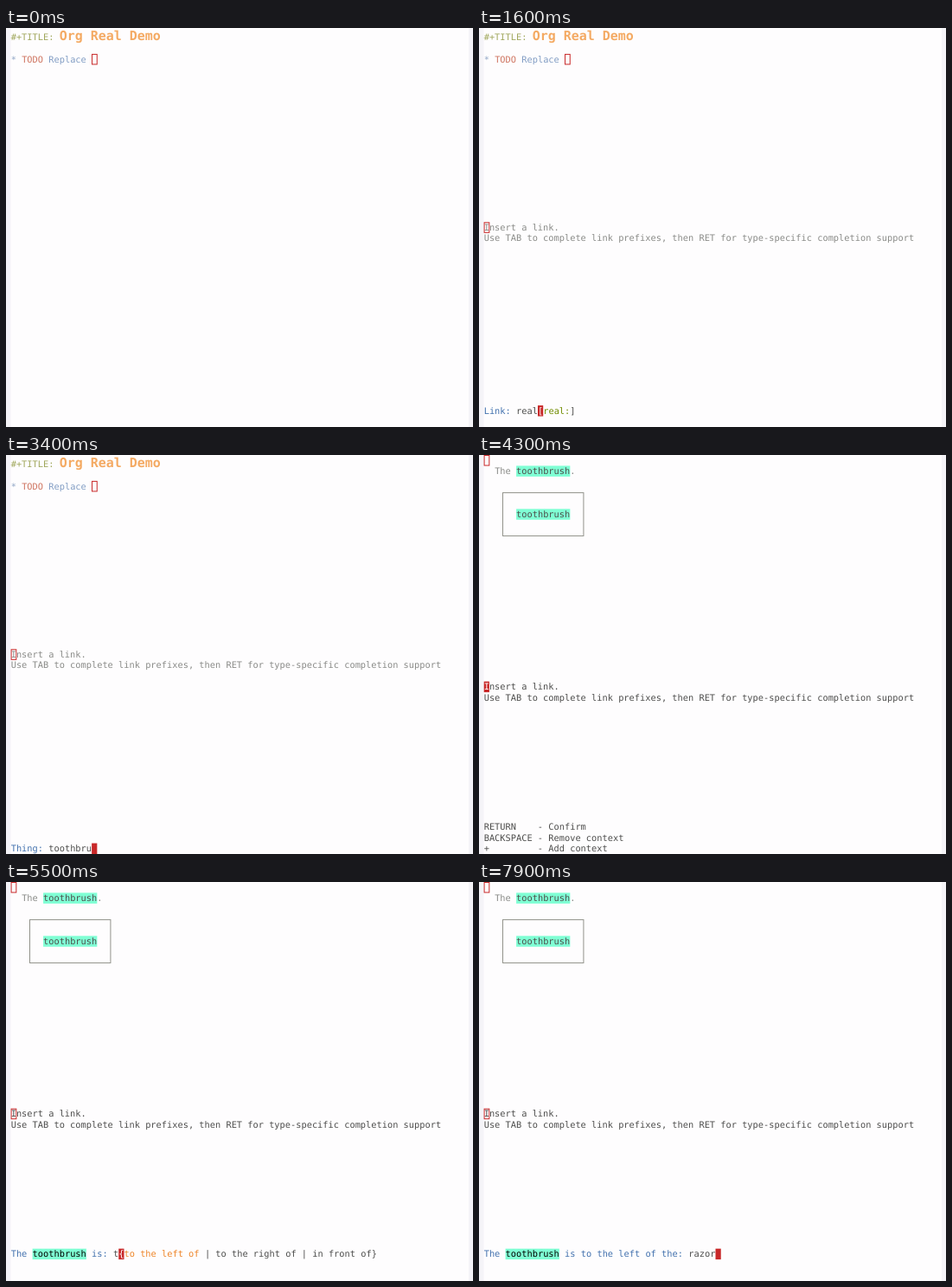
Write an HTML page that moves like this. It is 540 by 461 pixels and loops after 8000 ms.

```html
<!DOCTYPE html>
<html lang="en">
<head>
<meta charset="utf-8">
<title>Org Real Demo</title>
<style>
  html, body { margin: 0; width: 100%; height: 100%; overflow: hidden; background: #fefdfe; }
  svg { display: block; width: 540px; height: 461px; }
  text { font: 10.345px "DejaVu Sans Mono", monospace; white-space: pre; text-rendering: geometricPrecision; }
  .title { font-size: 14.95px; font-weight: bold; }
</style>
</head>
<body>
<svg id="stage" viewBox="0 0 540 461"></svg>
<script>
const LOOP = 8000, LEFT = 5.7, CHAR = 6.228, LINE = 12.46, COLUMNS = 85;
const FG = '#4d4d4c', DIM = '#8a8b88', RED = '#c82829', BLUE = '#4271ae';
const ORANGE = '#ee8427', GREEN = '#718c00', AQUA = '#7fffd4';
const stage = document.getElementById('stage');

const colX = col => LEFT + col * CHAR;
const rowY = row => row * LINE;
const box = (x, y, w, h, attrs) => `<rect x="${x}" y="${y}" width="${w}" height="${h}" ${attrs}/>`;
const label = (x, y, str, fill, cls = '') => `<text x="${x}" y="${y}" fill="${fill}" class="${cls}">${str}</text>`;
const hollow = (col, top) => box(colX(col) + .4, top + .5, CHAR - .5, LINE - .9, `fill="none" stroke="${RED}" stroke-width="1"`);
const solid = (col, top) => box(colX(col), top, CHAR, LINE, `fill="${RED}"`);

// A run is [text, colour, background].
function line(runs, row, col = 0) {
  let out = '';
  for (const [str, fill, back] of runs) {
    if (back) out += box(colX(col), rowY(row), str.length * CHAR, LINE, `fill="${back}"`);
    out += label(colX(col), rowY(row) + 9.75, str, fill);
    col += str.length;
  }
  return out;
}

function wrapArrows(row) {
  const y = rowY(row) + 6;
  const hook = 'fill="none" stroke="#4d4d4c" stroke-width=".9"';
  return `<path d="M536 ${y - 1.5}h2.6v3h-2.4m1.4-1.4l-1.4 1.4 1.4 1.4" ${hook}/>` +
    `<path d="M4 ${y + LINE - 1.5}h-2.6v3h2.4m-1.4-1.4l1.4 1.4-1.4 1.4" ${hook}/>`;
}

function choices(names, tail = '') {
  if (!names.length) return [];
  if (names.length === 1) return [['[', FG], [names[0], GREEN], [']', FG]];
  const rest = names.slice(1).map(name => ' | ' + name).join('');
  return [['{', FG], [names[0], ORANGE], [rest + tail + '}', FG]];
}

function minibuffer({ row, prompt, input = '', names = [], tail }) {
  const runs = [...prompt, [input, FG], ...choices(names, tail)];
  const cursor = [...prompt, [input]].reduce((n, [str]) => n + str.length, 0);
  let col = 0, out = '';
  for (const [str, fill, back] of runs) {
    const room = Math.max(0, COLUMNS - col);
    if (str.length > room) {
      out += line([[str.slice(0, room), fill, back]], row, col) + wrapArrows(row);
      out += line([[str.slice(room), fill, back]], row + 1);
    } else {
      out += line([[str, fill, back]], row, col);
    }
    col += str.length;
  }
  out += solid(cursor, rowY(row));
  if (names.length) out += line([[names.length > 1 ? '{' : '[', '#fff']], row, cursor);
  return out;
}

function orgWindow(active) {
  const [green, orange, star, red, blue] = active
    ? [GREEN, '#f5871f', BLUE, RED, BLUE]
    : ['#a0a75c', '#f4aa63', '#8fa5c5', '#cf7561', '#829dc4'];
  const top = 29.9;
  return label(LEFT, 13.9, '#+TITLE: ', green) + label(61.75, 13.9, 'Org Real Demo', orange, 'title') +
    label(LEFT, top + 9.75, '*', star) + label(colX(2), top + 9.75, 'TODO', red) +
    label(colX(7), top + 9.75, 'Replace', blue) +
    (active ? solid : hollow)(15, top);
}

function helpWindow(row, fill, active) {
  return line([['Insert a link.', fill]], row) +
    line([['Use TAB to complete link prefixes, then RET for type-specific completion support', fill]], row + 1) +
    (active ? solid(0, rowY(row)) + line([['I', '#fff']], row) : hollow(0, rowY(row)));
}

function realWindow() {
  const thing = ['toothbrush', FG, AQUA];
  return hollow(0, 0) +
    line([['The ', DIM], thing, ['.', DIM]], 1, 2) + line([thing], 5, 6) +
    box(colX(3.5), rowY(3.5), 15 * CHAR, 4 * LINE, 'fill="none" stroke="#91928a" stroke-width="1"');
}

const keyHelp = () => ['RETURN    - Confirm', 'BACKSPACE - Remove context', '+         - Add context']
  .map((str, i) => line([[str, FG]], 34 + i)).join('');

const linkTypes = 'eww rmail mhe irc info gnus docview bibtex bbdb w3m real id'.split(' ').map(s => s + ':');
const left = 'to the left of', right = 'to the right of', front = 'in front of';
const places = ['in', 'on', 'behind', front, 'above', 'below', left, right];

const insertScene = mini => orgWindow(false) + helpWindow(18, DIM, false) + minibuffer(mini);
const link = (input, names, tail) => () => insertScene({ row: 35, prompt: [['Link: ', BLUE]], input, names, tail });
const thing = input => () => insertScene({ row: 36, prompt: [['Thing: ', BLUE]], input });
const ask = (question, input, names) => () => realWindow() + helpWindow(21, FG, false) + minibuffer({
  row: 34, input, names, prompt: [['The ', BLUE], ['toothbrush', '#000', AQUA], [question, BLUE]]
});
const place = (input, names) => ask(' is: ', input, names);
const beside = input => ask(' is to the left of the: ', input);

const steps = [
  [0, () => orgWindow(false)],
  [400, () => orgWindow(true)],
  [900, link('', linkTypes, ' | ...')],
  [1300, link('r', ['rmail:', 'real:', 'irc:'])],
  [1400, link('re', ['real:'])],
  [1500, link('rea', ['real:'])],
  [1600, link('real', ['real:'])],
  [1800, link('real:')],
  [1900, thing('')],
  [2500, thing('t')],
  [2700, thing('to')],
  [2800, thing('too')],
  [2900, thing('toot')],
  [3100, thing('tooth')],
  [3300, thing('toothbr')],
  [3400, thing('toothbru')],
  [3500, thing('toothbrus')],
  [3600, thing('toothbrush')],
  [4300, () => realWindow() + helpWindow(21, FG, true) + keyHelp()],
  [4900, place('', places)],
  [5500, place('t', [left, right, front])],
  [5600, place('to the ', [left, right])],
  [5800, place('to the l', [left])],
  [6000, beside('')],
  [7200, beside('r')],
  [7400, beside('ra')],
  [7500, beside('raz')],
  [7700, beside('razo')],
  [7900, beside('razor')]
];

const backdrop = box(0, 0, 540, 461, 'fill="#fefdfe"') +
  box(0, 0, 5.5, 461, 'fill="#f5f4f8"') + box(535, 0, 5, 461, 'fill="#f5f4f8"');
let shown = null;

function render(ms) {
  const step = steps.findLast(([start]) => start <= ms);
  if (step === shown) return;
  shown = step;
  stage.innerHTML = backdrop + step[1]();
}

const begin = performance.now();
function tick() {
  render((performance.now() - begin) % LOOP);
  requestAnimationFrame(tick);
}
tick();
</script>
</body>
</html>
```
